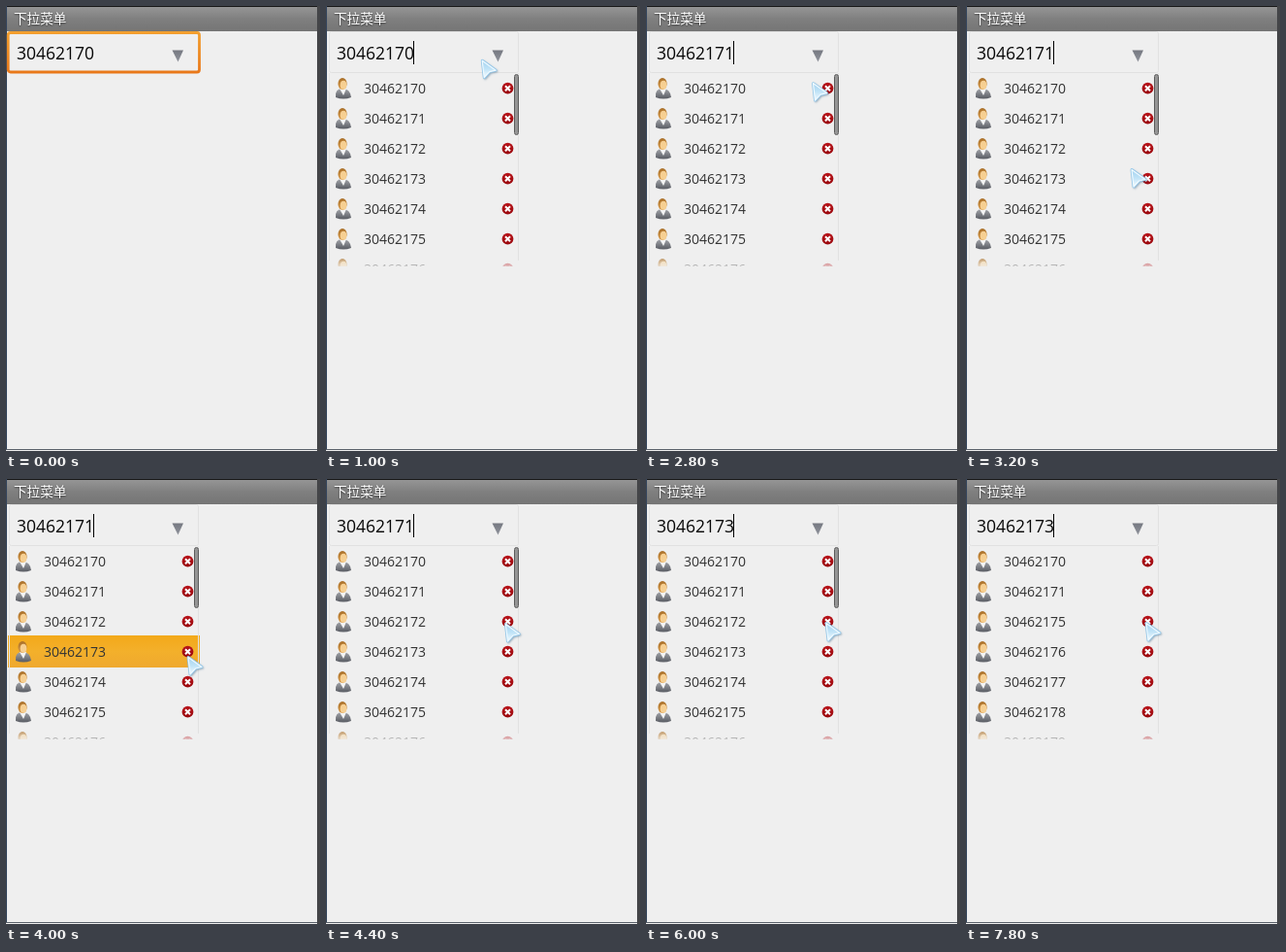
An HTML page with a canvas for the animation above (8 s loop, 324x458 px).

```html
<!DOCTYPE html>
<html lang="zh">
<head>
<meta charset="utf-8">
<title>下拉菜单</title>
<style>
html, body { margin: 0; width: 324px; height: 458px; overflow: hidden; background: #efefef; }
canvas { display: block; }
</style>
</head>
<body>
<canvas id="stage" width="324" height="458"></canvas>
<script>
const c = document.getElementById('stage').getContext('2d');
const LOOP = 8000, STEP = 200, ROW = 31, LIST_TOP = 69, LIST_END = 268;
const BG = '#efefef', PREFIX = '3046217';

// Places the pointer heads for, and when it gets there
const stops = [
  { t: 0, x: 345, y: 440 },
  { t: 800, x: 172, y: 46 },
  { t: 1800, x: 49, y: 120 },
  { t: 2600, x: 171, y: 46 },
  { t: 3200, x: 169, y: 166 },
  { t: 4000, x: 186, y: 181 },
  { t: 5200, x: 176, y: 50 },
  { t: 6000, x: 184, y: 146 }
];

const within = (t, a, b) => t >= a && t < b;
const clamp = (v, lo, hi) => Math.min(hi, Math.max(lo, v));
const ease = k => k * k * (3 - 2 * k);

function gradient(y0, y1, ...colors) {
  const g = c.createLinearGradient(0, y0, 0, y1);
  colors.forEach((color, i) => g.addColorStop(i / (colors.length - 1), color));
  return g;
}

function box(x, y, w, h, fill) {
  c.fillStyle = fill;
  c.fillRect(x, y, w, h);
}

function shape(d, fill, stroke, width = 1) {
  const p = new Path2D(d);
  if (fill) { c.fillStyle = fill; c.fill(p); }
  if (stroke) { c.strokeStyle = stroke; c.lineWidth = width; c.stroke(p); }
}

function disc(x, y, rx, ry, fill) {
  c.fillStyle = fill;
  c.beginPath();
  c.ellipse(x, y, rx, ry, 0, 0, 7);
  c.fill();
}

function frame(x, y, w, h, r, stroke, width) {
  c.beginPath();
  c.roundRect(x, y, w, h, r);
  c.strokeStyle = stroke;
  c.lineWidth = width;
  c.stroke();
}

function label(text, x, y, size, color) {
  c.font = `${size}px "Open Sans", "Noto Sans", "Noto Sans CJK SC", "Noto Sans CJK", sans-serif`;
  c.fillStyle = color;
  c.fillText(text, x, y);
}

function at(x, y, draw) {
  c.save();
  c.translate(x, y);
  draw();
  c.restore();
}

function drawWindow() {
  box(0, 0, 324, 458, BG);
  box(0, 0, 322, 26, gradient(1, 26, '#959595', '#7f7f7f', '#757575'));
  box(0, 0, 322, 1, '#181818');
  c.save();
  c.shadowColor = '#333';
  c.shadowBlur = 2;
  c.shadowOffsetY = 1;
  label('下拉菜单', 8, 18, 13.6, '#fff');
  c.restore();
  box(0, 0, 1, 457, '#35465e');
  box(0, 456, 322, 1, '#5b626b');
  box(321, 0, 3, 458, '#444548');
}

function drawField(text, open, caret) {
  if (open) frame(3.5, 26.5, 195, 42, 2, '#e1e1e1', 1);
  else frame(2.2, 27.5, 197.3, 40.5, 2.5, gradient(26, 69, '#f3a02f', '#e9781a'), 2.8);
  label(text, 11, 55, 17.5, '#080808');
  shape('M171.5 45.5H183L177.5 57.5Z', gradient(45, 57, '#74777f', '#8f929b'));
  if (caret) box(90, 36, 1, 24, '#000');
}

function drawPerson() {
  shape('M1 20Q0 11 8 11T17 20Q9 23 1 20Z', gradient(11, 21, '#a3a5aa', '#5c5f66'));
  shape('M5 11L9 18L12 11Z', '#f4f4f4');
  disc(8, 6, 4.6, 6, gradient(0, 12, '#a96f28', '#d89a48'));
  disc(9, 7.2, 3.3, 4.5, '#f6cf92');
}

function drawDelete() {
  disc(0, 0, 5.9, 5.9, gradient(-6, 6, '#b9151b', '#98070d'));
  shape('M-2.5-2.5L2.5 2.5M2.5-2.5L-2.5 2.5', null, '#fff', 2);
}

function drawList(removed, pressed, barAlpha) {
  c.save();
  c.beginPath();
  c.rect(2, LIST_TOP, 198, LIST_END - LIST_TOP);
  c.clip();
  for (let i = 0; i < 7; i++) {
    const y = LIST_TOP + i * ROW;
    if (i === pressed) box(2, y - 1, 198, ROW + 2, gradient(y, y + ROW, '#f3a91a', '#f3b02b', '#efa92f'));
    at(9, y + 5, drawPerson);
    label(PREFIX + (i < 2 ? i : i + removed), 39, y + 21, 14, '#333');
    at(187.5, y + 15.7, drawDelete);
  }
  box(2, 254, 198, 14, gradient(254, 272, 'rgba(239,239,239,0)', BG));
  c.restore();
  box(3, LIST_TOP, 1, 193, '#e3e3e3');
  box(198, LIST_TOP, 1, 193, '#e1e1e1');
  c.globalAlpha = barAlpha;
  box(195, 71, 3, 61, '#959595');
  frame(194.5, 70.5, 4, 62, 2, '#5b5b5b', 1);
  c.globalAlpha = 1;
}

function drawPointer(t) {
  const next = stops.findIndex(s => s.t > t);
  const b = stops.at(next), a = next < 0 ? b : stops[next - 1];
  const k = a === b ? 1 : ease((t - a.t) / (b.t - a.t));
  at(a.x + (b.x - a.x) * k, a.y + (b.y - a.y) * k, () => {
    const arrow = 'M2 2.5L16 12.5L9.5 14L4 20Z';
    c.lineJoin = 'round';
    c.save();
    c.shadowColor = 'rgba(70,110,140,.4)';
    c.shadowBlur = 2;
    c.shadowOffsetX = c.shadowOffsetY = 1;
    shape(arrow, '#fff', '#94c8ea', 2.8);
    c.restore();
    shape(arrow, gradient(2, 20, '#a3d2f0', '#c0e3f7', '#f2fbff'), '#f0faff', 1.2);
  });
}

function draw(t) {
  const open = within(t, 1000, 1600) || within(t, 2800, 4600) || t >= 5600;
  const digit = t < 1600 ? 0 : t < 4600 ? 1 : 3;
  const caret = t >= 600 && !within(t, 2200, 2600);
  const removed = clamp(Math.floor((t - 6200) / 400), 0, 3);
  const pressed = within(t, 1400, 1600) ? 1 : within(t, 3800, 4400) ? 3 : -1;

  drawWindow();
  drawField(PREFIX + digit, open, caret);
  if (open) drawList(removed, pressed, clamp((6600 - t) / 400, 0, 1));
  if (t >= STEP) drawPointer(t);
}

const start = performance.now();
function tick() {
  const t = (performance.now() - start) % LOOP;
  draw(Math.floor(t / STEP) * STEP);
  requestAnimationFrame(tick);
}
tick();
</script>
</body>
</html>
```
